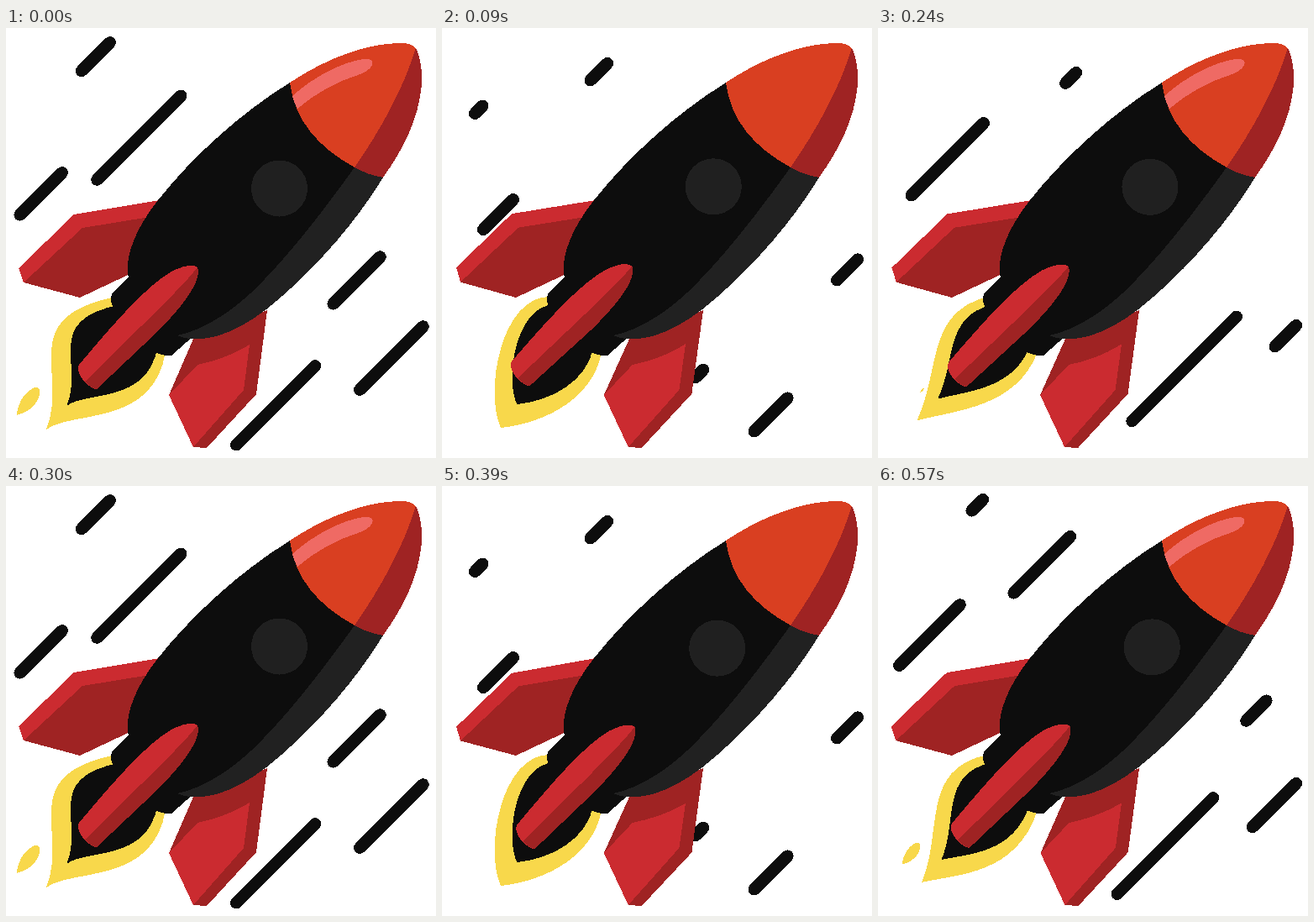
These frames come from a looping animation (512 px wide and 512 px high, 600 ms). An HTML page:

```html
<!DOCTYPE html>
<html lang="en">
<head>
<meta charset="utf-8">
<title>Rocket</title>
<style>
  html, body { margin: 0; width: 100%; height: 100%; overflow: hidden; background: #fff; }
  svg { display: block; width: 100vw; height: 100vh; }
</style>
</head>
<body>
<svg viewBox="0 0 512 512" shape-rendering="crispEdges">
  <g id="streaks" stroke="#0d0d0d" stroke-width="14.3" stroke-linecap="round"></g>
  <g fill="#f8d84b">
    <path id="flame"/>
    <path id="sideDrop"/>
    <path id="lowDrop"/>
  </g>
  <path id="core" fill="#0d0d0d"/>
  <path id="leftFin" fill="#cb2b30"/>
  <path id="leftShade" fill="#9f2323"/>
  <path id="rightFin" fill="#9f2323"/>
  <path id="rightLight" fill="#cb2b30"/>
  <g fill="#0d0d0d">
    <path d="M148 294L128 314Q122 321 127 331Q133 343 142 352L172 383Q184 391 197 390L224 366Z"/>
    <path d="M338 65C275 104 219 157 181 205C151 243 143 273 145 294Q164 338 205 366Q213 370 221 370C242 372 272 364 310 335C358 297 411 240 449 178L415 166Z"/>
  </g>
  <path fill="#212121" d="M415 166C370 229 328 281 291 316C258 346 229 361 204 366Q213 370 221 370C242 372 272 364 310 335C358 297 411 240 449 178Z"/>
  <path fill="#d93f21" d="M338 65C383 35 431 18 470 18Q485 18 488 25L475 90L415 166C372 142 344 111 338 65Z"/>
  <path fill="#9f2323" d="M488 24Q496 40 495 68C491 108 474 143 449 178Q431 175 415 166C446 121 472 75 488 24Z"/>
  <path id="shine" fill="#ef6a64" d="M341 81C366 58 400 41 425 37Q439 36 436 44Q433 51 419 56C393 64 368 78 347 96Q343 89 341 81Z"/>
  <circle id="porthole" r="33.5" fill="#202020"/>
  <path id="frontFin" fill="#cb2b30"/>
  <path id="frontShade" fill="#9f2323"/>
</svg>
<script>
const FRAME = 30, LOOP = 20, CYCLE = 10;
const el = id => document.getElementById(id);
const mix = (a, b, u) => a + (b - a) * u;
const clamp = u => Math.min(1, Math.max(0, u));
const easeOut = u => Math.sin(clamp(u) * Math.PI / 2);
const easeIn = u => 1 - Math.cos(clamp(u) * Math.PI / 2);
const draw = (id, d) => el(id).setAttribute('d', d);
const poly = points => 'M' + points.map(p => p.join(' ')).join('L') + 'Z';
const since = (t, start) => (t - start + CYCLE) % CYCLE;

// A streak runs down the diagonal x + y = sum: its head eases out, its tail eases in.
const streaks = [
  { sum: 141, from: 125, to: 25, start: 8.4, span: 7, delay: 1.2, tailSpan: 4 },
  { sum: 289, from: 236, to: 49, start: 7.8, span: 4.6, delay: 0.2, tailSpan: 5.7 },
  { sum: 239, from: 197, to: 14, start: 2.4, span: 8.5, delay: 0.6, tailSpan: 8.6 },
  { sum: 718, from: 464, to: 300, start: 8.5, span: 5, delay: 0.1, tailSpan: 4.6 },
  { sum: 852, from: 498, to: 365, start: 7.1, span: 7.4, delay: 2.5, tailSpan: 4.4 },
  { sum: 770.5, from: 495, to: 271, start: 2.4, span: 8.5, delay: 0.6, tailSpan: 9.8 }
];
for (const s of streaks) {
  s.line = document.createElementNS('http://www.w3.org/2000/svg', 'line');
  el('streaks').append(s.line);
}

function drawStreak({ sum, from, to, start, span, delay, tailSpan, line }, t) {
  const age = since(t, start);
  const x1 = mix(from, to, easeOut(age / span));
  const x2 = mix(from, to, easeIn((age - delay) / tailSpan));
  const ends = { x1, y1: sum - x1, x2, y2: sum - x2 };
  for (const k in ends) line.setAttribute(k, ends[k]);
  line.style.display = x2 - x1 > 4 ? '' : 'none';
}

// Each pose: two left handles, the tip, two right handles.
const poses = [
  { time: 0, points: [[10, 345], [75, 410], [48, 478], [80, 455], [175, 475]] },
  { time: 3, points: [[71, 317], [50, 432], [70, 476], [125, 470], [180, 440]] },
  { time: 6, points: [[70, 345], [70, 395], [35, 458], [95, 440], [163, 429]] },
  { time: 9, points: [[50, 337], [78, 410], [52, 472], [95, 462], [165, 463]] }
];

function drawFlame(t) {
  const i = poses.findLastIndex(p => p.time <= t);
  const a = poses[i], b = poses[(i + 1) % poses.length];
  const u = (t - a.time) / ((b.time || CYCLE) - a.time);
  const [l1, l2, tip, r1, r2] = a.points.map((p, k) => p.map((v, n) => mix(v, b.points[k][n], u)));
  const d = `M130 320C${l1} ${l2} ${tip}C${r1} ${r2} 190 386Z`;
  draw('flame', d);
  draw('core', d);
  el('core').setAttribute('transform', 'translate(150 360) scale(.76) translate(-150 -360)');
}

// A drop swells and shrinks while it drifts away.
function drawDrop(id, age, { from, to, length, width, angle }) {
  const u = clamp(age), size = Math.sin(u * Math.PI) / 2;
  const l = length * size, w = width * size;
  draw(id, `M${-l} 0C${-l * .4} ${-w} ${l * .2} ${-w * 1.2} ${l * .7} ${-w * .8}` +
    `Q${l * 1.15} ${-w * .4} ${l * .9} ${w * .3}C${l * .4} ${w * 1.3} ${-l * .4} ${w * 1.1} ${-l} 0Z`);
  const [x, y] = from.map((v, k) => mix(v, to[k], u));
  el(id).setAttribute('transform', `translate(${x} ${y}) rotate(${angle})`);
}

function drawFins(sway) {
  const k = Math.abs(sway), x = 2.5 * k, y = -sway;
  const tip = [15 + x, 286 + y], heel = [21 + x / 2, 303 + y / 2], foot = [88, 321];
  draw('leftFin', poly([tip, [81 + x, 222 + y], [183, 205], [160, 285], foot, heel]));
  draw('leftShade', poly([heel, [91, 238 + y / 2], [171, 225], [160, 287], foot]));

  const r = -1.5 * k;
  const side = [194 + r, 437], low = [223 + r, 499];
  draw('rightFin', poly([[224, 368], side, low, [239 + r, 500], [298 + r / 2, 436 + y / 2], [311, 336]]));
  draw('rightLight', `M${side}L${228 + r} 401Q262 394 290 ${377 + y}L${283 + r / 2} 431L${low}Z`);

  // The lower end of the front fin swings further than its top.
  const top = -2 * sway, end = -4 * sway - k;
  const at = (px, py) => {
    const d = mix(end, top, (px - 86) / 142);
    return [px + d, py + d];
  };
  const back = `${at(108, 430)}L${at(181, 361)}Q${at(235, 306)} ${at(228, 285)}Z`;
  draw('frontFin', `M${at(228, 285)}Q${at(219, 279)} ${at(197, 290)}` +
    `C${at(168, 307)} ${at(133, 346)} ${at(87, 401)}Q${at(83, 409)} ${at(94, 422)}Q${at(103, 430)} ${back}`);
  draw('frontShade', `M${at(228, 285)}C${at(210, 308)} ${at(177, 339)} ${at(94, 421)}Q${at(102, 429)} ${back}`);
}

function render(now) {
  const frame = Math.floor(now / FRAME) % LOOP, t = frame % CYCLE;
  const sway = Math.sin(frame / LOOP * 2 * Math.PI);
  streaks.forEach(s => drawStreak(s, t));
  drawFlame(t);
  drawDrop('sideDrop', since(t, 7.8) / 4.2,
    { from: [55, 430], to: [0, 459], length: 42, width: 17, angle: -49 });
  drawDrop('lowDrop', since(t, 4.5) / 3,
    { from: [91, 456], to: [65, 468], length: 55, width: 17, angle: -25 });
  drawFins(sway);
  el('porthole').setAttribute('cx', 325.5 - 2.7 * sway);
  el('porthole').setAttribute('cy', 191 - 2.7 * sway);
  el('shine').style.display = t >= 2 && t <= 4 ? 'none' : '';
}

const start = performance.now();
function tick() {
  render(performance.now() - start);
  requestAnimationFrame(tick);
}
tick();
</script>
</body>
</html>
```
